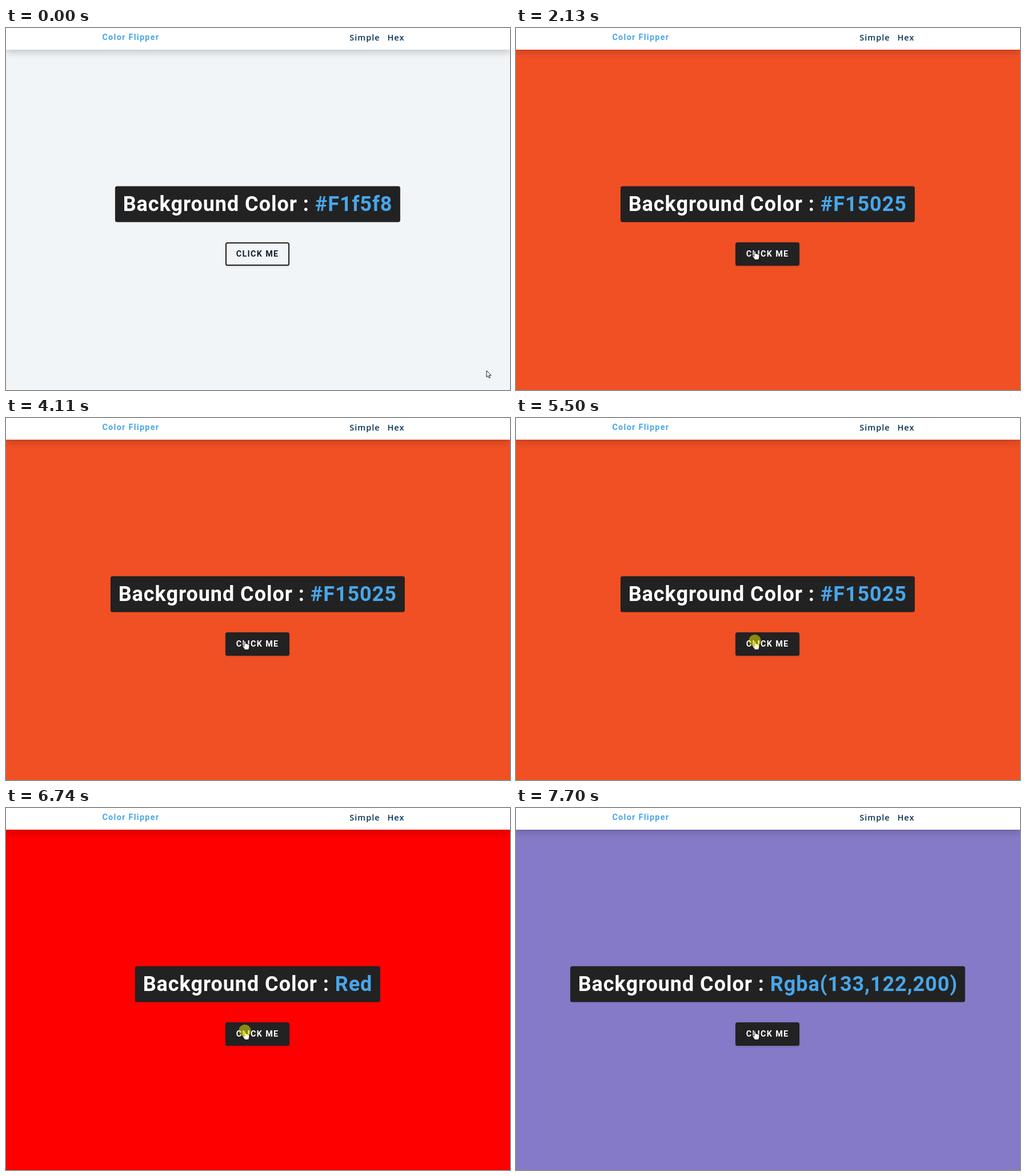
These frames come from a looping animation (882 by 635 pixels, 8 s). An HTML page:

```html
<!DOCTYPE html>
<html lang="en">
<head>
<meta charset="utf-8">
<title>Color Flipper</title>
<style>
html, body { margin: 0; width: 100%; height: 100%; overflow: hidden; }
#page { position: absolute; inset: 0; overflow: hidden; }
#page > * { position: absolute; box-sizing: border-box; }
nav { left: 0; top: 0; width: 100%; height: 38px; background: #fff; box-shadow: 0 4.5px 13.5px rgba(0,0,0,.2); }
.text { line-height: 0; white-space: pre; font: 700 14.4px/0 Roboto, sans-serif; }
.link { top: 17px; font: 600 14.4px/0 "Open Sans", sans-serif; letter-spacing: 1.1px; color: #063251; }
#logo { left: 168.4px; top: 17.4px; letter-spacing: 1.3px; color: #49a6e9; }
#box { left: 0; top: 0; height: 63px; border-radius: 3.6px; background: #222; }
#title { top: 309px; font-size: 36px; letter-spacing: .95px; color: #fff; }
#name { color: #49a6e9; }
#btn { left: 384px; top: 376px; width: 112px; height: 41px; border: 2px solid #222; border-radius: 3.6px; box-shadow: 0 1px 3px rgba(0,0,0,.2); }
#label { left: 402.8px; top: 397px; letter-spacing: 1.3px; }
svg { left: 0; top: 0; }
</style>
</head>
<body>
<div id="page">
  <nav></nav>
  <div id="logo" class="text">Color Flipper</div>
  <div id="simple" class="text link" style="left:601.2px">Simple</div>
  <div class="text link" style="left:667.4px">Hex</div>
  <div id="box"></div>
  <div id="title" class="text">Background Color : <span id="name"></span></div>
  <div id="btn"></div>
  <div id="label" class="text">CLICK ME</div>
  <svg width="882" height="635">
    <g id="cursor" fill="#fff" stroke="#000" stroke-width=".9" stroke-linejoin="round">
      <path id="arrow" d="M0 0V11.4L2.6 9L4.5 13L6.2 12.3L4.4 8.3H8Z"/>
      <path id="hand" d="M-1.3 1Q0-.8 1.3 1V5Q2.6 4 3.6 5.4Q5 4.8 5.8 6Q7.6 5.6 7.8 7.2V11Q7.4 13.5 6.2 15.6H-.2Q-1.6 12.5-4 10Q-4.6 8-2.9 8.2L-1.3 9.6Z"/>
    </g>
    <circle id="press" cx="418" cy="390.5" r="10.6" fill="#ff0" fill-opacity=".47"/>
  </svg>
</div>
<script>
const $ = id => document.getElementById(id);

// label, page colour, title box width
const START = ['#F1f5f8', '#f1f5f8', 499];
const GREEN = ['Green', 'green', 466];
const RED = ['Red', 'red', 429];
const VIOLET = ['Rgba(133,122,200)', 'rgb(133,122,200)', 691];
const ORANGE = ['#F15025', '#f15025', 515];

// press time, release time, colour after release
const clicks = [
  [1710, 1780, GREEN], [2060, 2130, ORANGE], [2430, 2530, VIOLET],
  [2850, 2960, ORANGE], [3310, 3380, RED], [3730, 3800, GREEN],
  [4040, 4110, ORANGE], [4400, 4470, ORANGE], [4850, 4920, ORANGE],
  [5200, 5270, ORANGE], [5500, 5550, RED], [6010, 6050, GREEN],
  [6330, 6380, VIOLET], [6500, 6560, RED], [6740, 6790, GREEN],
  [6990, 7030, ORANGE], [7260, 7310, GREEN], [7450, 7510, RED],
  [7640, 7700, VIOLET]
];
const LOOP = 8000, LINK_IN = 500, LINK_OUT = 947, BTN_IN = 1466;

const ramp = (t, start, length) => Math.min(1, Math.max(0, (t - start) / length));
const easeOut = u => 1 - (1 - u) ** 3;
const lerp = (a, b, u) => a + (b - a) * u;
const mix = (a, b, u) => `rgb(${a.map((v, i) => Math.round(lerp(v, b[i], u)))})`;
const curve = (a, b, c, u) => lerp(lerp(a, b, u), lerp(b, c, u), u);

function cursorAt(t) {
  if (t < 890) {
    const u = easeOut(ramp(t, 20, 690));
    return [lerp(841, 628, u), lerp(601, 12, u)];
  }
  const u = easeOut(ramp(t, 890, 790));
  return [curve(628, 560, 418, u), curve(12, -42, 391, u)];
}

function draw(t) {
  let state = START, pressed = false;
  for (const [down, up, next] of clicks) {
    if (t >= up) state = next;
    else if (t >= down) pressed = true;
  }
  const [name, color, width] = state;
  const left = 440.4 - width / 2;
  $('page').style.background = color;
  $('box').style.transform = `translate(${left}px, 277.6px)`;
  $('box').style.width = width + 'px';
  $('title').style.left = left + 13.8 + 'px';
  if ($('name').textContent !== name) $('name').textContent = name;

  const link = ramp(t, LINK_IN, 200) - ramp(t, LINK_OUT, 200);
  const hover = ramp(t, BTN_IN, 200);
  $('simple').style.color = mix([6, 50, 81], [73, 166, 233], link);
  $('btn').style.background = `rgba(34,34,34,${hover})`;
  $('label').style.color = mix([16, 32, 46], [255, 255, 255], hover);

  const hand = t >= BTN_IN || (t >= LINK_IN && t < LINK_OUT);
  $('cursor').setAttribute('transform', `translate(${cursorAt(t)})`);
  $('hand').style.display = hand ? '' : 'none';
  $('arrow').style.display = hand ? 'none' : '';
  $('press').style.display = pressed ? '' : 'none';
}

const begin = performance.now();
function tick() {
  draw((performance.now() - begin) % LOOP);
  requestAnimationFrame(tick);
}
tick();
</script>
</body>
</html>
```
